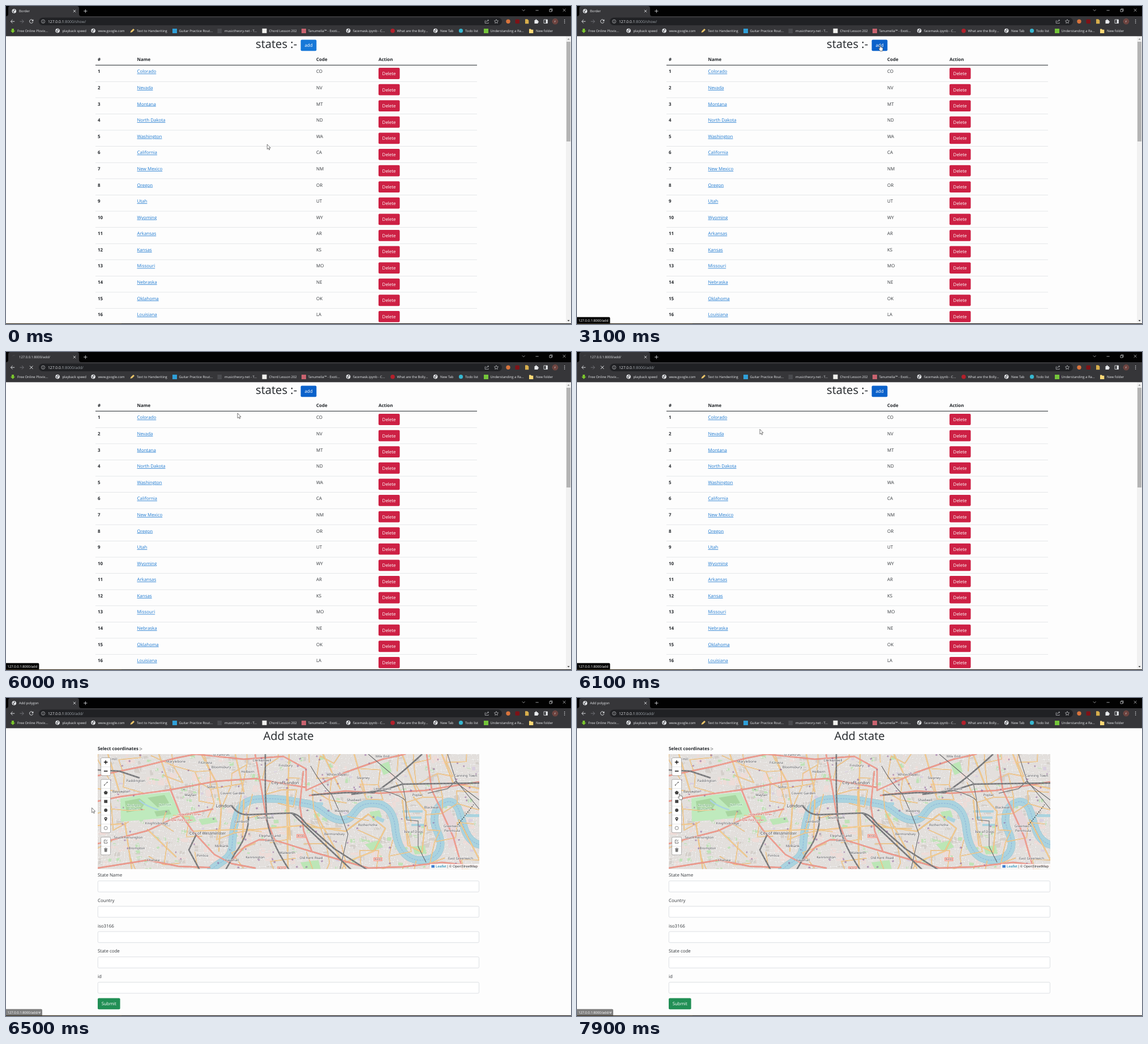
These frames come from a looping animation (998 by 561 pixels, 8 s). An HTML page:

```html
<!DOCTYPE html>
<html lang="en">
<head>
<meta charset="utf-8">
<title>States</title>
<style>
html, body { margin: 0; width: 100%; height: 100%; overflow: hidden; background: #fdfdfd; }
svg { display: block; width: 100vw; height: 100vh; text-rendering: geometricPrecision; }
text { font-family: "Open Sans", "Noto Sans", sans-serif; white-space: pre; }
.link { text-decoration: underline; text-decoration-thickness: .5px; }
.place text { font-family: "Noto Sans", sans-serif; text-anchor: middle; paint-order: stroke;
  stroke: #fff; stroke-opacity: .65; stroke-width: 1.3px; stroke-linejoin: round; }
.credit text { font-family: "Liberation Sans", Arial, sans-serif; }
</style>
</head>
<body>
<svg id="stage" viewBox="0 0 998 561" preserveAspectRatio="none"></svg>
<script>
const LOOP = 8000, STEP = 100;
const INK = '#212529', PALE = '#e8eaed';

const text = (x, y, s, size = 7.95, fill = INK, more = '') =>
  `<text x="${x}" y="${y}" font-size="${size}" fill="${fill}" ${more}>${s}</text>`;
const rect = (x, y, w, h, fill, r = 0, more = '') =>
  `<rect x="${x}" y="${y}" width="${w}" height="${h}" fill="${fill}" rx="${r}" ${more}/>`;
const disc = (x, y, r, fill, more = '') =>
  `<circle cx="${x}" cy="${y}" r="${r}" fill="${fill}" ${more}/>`;
const line = (d, stroke = PALE, w = .8, more = '') =>
  `<path d="${d}" fill="none" stroke="${stroke}" stroke-width="${w}" ${more}/>`;
const area = (d, fill, more = '') => `<path d="${d}" fill="${fill}" ${more}/>`;
const group = (id, body, more = '') => `<g id="${id}" ${more}>${body}</g>`;
const BOLD = 'font-weight="700"', MID = 'text-anchor="middle"';

let seed = 11;
const rnd = () => (seed = (seed * 16807) % 2147483647) / 2147483647;

/* ---------- browser frame ---------- */
const globe = (x, y) => disc(x, y, 3.8, PALE) +
  area(`M${x - 3} ${y - 1}l2.4 1.2 1 1.6-1.4 1.6zM${x - .3} ${y - 3}l2.6 1.2-1.2 1.6-1.8-.6z`, '#5a5b5f');

function bookmarks() {
  const mark = (x, y, s) => text(x, y, s, 5.92, PALE);
  const items = [[20, 'Free Online Plovix...'], [99.5, 'playback speed', 1], [162.5, 'www.google.com', 1],
    [231, 'Text to Handwriting'], [305.5, 'Guitar Practice Rout...'], [386, 'musictheory.net - T...'],
    [464.5, 'Chord Lesson 202'], [533.5, 'Tanumelia™ - Exoti...'], [613, 'facemask.ipynb - C...', 1],
    [690.5, 'What are the Bolly...'], [767, 'New Tab', 1], [811, 'Todo list'],
    [855.5, 'Understanding a Ra...'], [936, 'New folder']];
  return items.map(([x, s, web]) => mark(x, 46, s) + (web ? globe(x - 8.4, 43.6) : '')).join('') +
    area('M10 40h4v3.4h2.2l-4.2 4.4-4.2-4.4H10z', '#7ac52c') +
    area('M219.5 47l1-3 4.5-4 2 2-4 4z', '#e9c46a') +
    rect(294, 40, 8, 8, '#2f9fd8') + rect(373.5, 40, 7.5, 8, '#4a4b4f') +
    rect(452.5, 39.8, 8, 8, '#f1f1ee') + rect(522, 40, 8, 8, '#c9636f') +
    disc(683, 43.7, 3.8, '#b3202b') + disc(803.5, 43.7, 3.6, '#36b7d0') + rect(844, 40, 8, 8, '#74c53a') +
    area('M924 40.5h3l1 1.2h3.3v6.2H924z', '#fbd977');
}

function chrome() {
  return rect(0, 0, 998, 18, '#020202') +
    area('M0 18Q4 18 4 14V4Q4 0 8 0H125Q129 0 129 4V14Q129 18 133 18z', '#363639') +
    rect(0, 18, 998, 35.3, '#363639') + rect(58, 20.5, 818, 13.5, '#202124', 6.75) +
    group('favicon', globe(14.3, 9)) + group('spinner', line('M11.5 7.5A3.3 3.3 0 0 1 15.5 6', '#505054', .8)) +
    text(23, 11, '', 5.92, PALE, 'id="title"') +
    line('M118.8 6.8l4.4 4.4m0-4.4l-4.4 4.4M140.3 5.8v6.4M137.1 9h6.4') +
    line('M911.8 6.3l2.4 2.4 2.4-2.4M935.5 7.8h5.2M960 6.2h3.8v3.8H960zM961 6v-1h4v4h-1M983.7 5l4.8 4.8m0-4.8l-4.8 4.8', PALE, .65) +
    line('M15.2 27.2H8.6m3-3.2l-3.2 3.2 3.2 3.2', PALE, .9) +
    line('M24.5 27.2h6.6m-3-3.2l3.2 3.2-3.2 3.2', '#78797d', .9) +
    group('reload', line('M47.5 25.4A3.2 3.2 0 1 0 47.8 28', PALE, .9) + area('M48.3 23.6v3.2h-3.2z', PALE)) +
    group('stop', line('M42 24.5l5.4 5.4m0-5.4l-5.4 5.4', PALE, 1)) +
    disc(65.6, 27.2, 3.1, 'none', `stroke="${PALE}" stroke-width=".6"`) + line('M65.6 26.8v2M65.6 25.2v.7', PALE, .7) +
    `<text x="74" y="29.7" font-size="6.76" fill="#9aa0a6"><tspan fill="${PALE}">127.0.0.1</tspan><tspan id="url"></tspan></text>` +
    line('M847.5 26h-1.3v4.4h6V29M848.3 28.5q.3-3 4-3.2m-1.4-1.6l1.8 1.6-1.8 1.6', PALE, .6) +
    line('M866 23.6l1.1 2.3 2.5.3-1.9 1.7.5 2.5-2.2-1.2-2.2 1.2.5-2.5-1.9-1.7 2.5-.3z', PALE, .6) +
    disc(887, 27.2, 3.7, '#d9743c') + rect(899.5, 23.5, 7.5, 7.5, '#7d1217', 1.5) +
    area('M917 23.3h4l2.3 2.3v5.7H917z', '#d7ae4c') +
    area('M933.5 25h1.7q0-1.8 1.2-1.8t1.2 1.8h2v2q1.6 0 1.6 1.1t-1.6 1.1v1.9h-6.1z', PALE) +
    line('M950 24h6.4v6.4H950z', PALE, .8) + rect(953.6, 24, 2.8, 6.4, PALE) +
    disc(970, 27.2, 5.4, '#6d4440') + text(970, 29, 'r', 5.6, '#fff', MID) +
    [24.4, 27.2, 30].map(y => disc(986.6, y, .75, PALE)).join('') + bookmarks();
}

/* ---------- list page ---------- */
const STATES = ('Colorado CO,Nevada NV,Montana MT,North Dakota ND,Washington WA,California CA,New Mexico NM,Oregon OR,' +
  'Utah UT,Wyoming WY,Arkansas AR,Kansas KS,Missouri MO,Nebraska NE,Oklahoma OK,Louisiana LA').split(',');

function listPage() {
  let out = text(441, 74.4, 'states :-', 20.2, INK, 'font-weight="500"') +
    rect(520.6, 59.4, 27.8, 19.8, '', 2, 'id="addBtn"') + text(534.5, 72.1, 'add', 7.95, '#fff', MID) +
    [[162, '#'], [231.5, 'Name'], [548, 'Code'], [658, 'Action']].map(([x, s]) => text(x, 96.7, s, 7.9, INK, BOLD)).join('') +
    rect(158, 103.8, 674, 1.1, '#34383c');
  STATES.forEach((s, i) => {
    const y = i * 28.59;
    out += text(162, y + 118.4, i + 1, 7.9, INK, BOLD) +
      text(231.5, y + 118.4, s.slice(0, -3), 7.95, '#1b78d0', 'class="link"') +
      text(548, y + 118.4, s.slice(-2), 7.95, '#33373b') +
      rect(658, y + 109.1, 37.5, 19.8, '#cd2044', 2) + text(676.6, y + 122, 'Delete', 7.95, '#fff', MID) +
      rect(158, y + 133, 674, .6, '#d5d9dc');
  });
  return out + rect(989, 53.3, 9, 507, '#f1f1f1') + rect(990, 63, 7, 176, '#b4b4b4') +
    area('M991.6 59.4h4l-2-2.4z', '#888') + area('M991.6 554h4l-2 2.4z', '#444');
}

/* ---------- map ---------- */
function lattice(step, keep) {
  const cols = Math.ceil(720 / step), rows = Math.ceil(240 / step), at = [];
  for (let j = 0; j <= rows; j++) for (let i = 0; i <= cols; i++) {
    const x = 142 + (i + rnd() * .55) * step, y = 80 + (j + rnd() * .55) * step;
    at.push([x + 13 * Math.sin(y / 37 + x / 90), y + 12 * Math.sin(x / 47)].map(v => v.toFixed(1)));
  }
  let d = '';
  at.forEach((p, k) => {
    if ((k + 1) % (cols + 1) && rnd() < keep) d += `M${p}L${at[k + 1]}`;
    if (at[k + cols + 1] && rnd() < keep) d += `M${p}L${at[k + cols + 1]}`;
  });
  return d;
}

function patches(n, size) {
  let d = '';
  while (n--) {
    const w = 2 + rnd() * size, h = 2 + rnd() * size * .7, s = rnd() * 4 - 2;
    d += `M${(162 + rnd() * 674).toFixed(1)} ${(99 + rnd() * 203).toFixed(1)}l${w} ${s} ${-s} ${h} ${-w} ${-s}z`;
  }
  return d;
}

const PLACES = `Marylebone,300,112;Fitzrovia,352,113.5;St Pancras,380,100;Bloomsbury,380,122;Clerkenwell,452,110;
Finsbury,494,119;Holborn,427,130;Paddington,229,146;Bayswater,203,165;Soho,362,157;Mayfair,326,171;Covent Garden,400,168;
Whitechapel,584,135;Stepney,631,141;Mile End,665,103;Limehouse,665,160;Poplar,727,171;Canning Town,812,137;Shadwell,615,180;
Wapping,593,199;Blackwall,752,193;Rotherhithe,639,224;Southwark,458,211;Lambeth,416,218;Knightsbridge,266,221;
South Kensington,216,246;Brompton,231,265;Chelsea,260,286;Millbank,381,261;Pimlico,347,278;Vauxhall,399,286;
Kennington,440,281;Elephant and,466,243;Castle,466,251;Walworth,497,273;Old Kent Road,539,282;Bermondsey,580,240;
Isle of Dogs,720,236;Greenwich,788,226;Peninsula,788,234;East Greenwich,803,283;ing Hill,186,108`;

function tiles() {
  const round = 'stroke-linejoin="round" stroke-linecap="round"';
  const cased = (d, casing, fill, w) => line(d, casing, w + .7, round) + line(d, fill, w, round);
  const river = 'M360 306C372 290 397 287 399 264C401 240 402 226 407 210C413 186 428 178 452 178C485 176 510 183 535 187' +
    'C562 193 566 214 594 215C620 214 612 188 643 186C672 184 683 200 687 224C689 255 700 283 728 286' +
    'C766 288 774 262 763 238C752 216 754 190 780 183C803 180 803 218 812 236C818 250 828 258 842 260';
  const rail = 'M162 127L200 129 236 141M458 99V165L460 203M398 189Q408 205 425 206L500 203Q516 202 530 222L580 266 638 303' +
    'M460 206Q462 245 500 303M428 209Q430 240 404 275L388 303M540 171L600 167 650 167Q680 150 735 99' +
    'M336 241L323 268 342 303M610 170L665 163 700 152 836 150M505 203L560 256 610 303';
  const thin = 'M664 163Q700 172 706 182L708 215 728 217 728 262 742 290M745 168L780 160 795 146 836 196M780 99L796 150 836 180' +
    'M538 120Q555 150 575 170Q592 205 604 240L590 302M640 99L700 150 706 180';
  const trunk = 'M162 137L240 121 300 106 335 99M290 160L308 205M162 257L250 234 292 214 310 207 365 196M310 207L330 235 368 276 398 292' +
    'L440 300M398 288L422 262 447 250 475 251 540 271 640 300M536 172L600 164 660 168 740 163 836 148M525 130L519 190 526 235 540 270' +
    'M752 162L743 99M752 162L766 192 790 245 806 301M162 300L250 286 305 297 360 299M530 163L600 131 665 108 705 99' +
    'M335 99L420 108 490 103 530 125 530 163M475 251L460 215 452 165 440 99M640 300L700 298 770 290 836 297M162 182L202 174 290 162 370 147 440 142 530 158';
  const main = 'M180 99L200 165M270 99L292 162M345 99L372 150 380 195 376 270M405 99L420 165M500 99L498 170 502 250M560 99L590 160' +
    'M615 99L635 170M700 180L710 260 735 272 742 200 720 175M600 235L640 205 670 230 650 270 600 290M210 220L222 301M250 232L300 280' +
    'M162 225L203 222M330 235L405 232 440 232 520 225 600 235M420 180L418 250M496 165L498 300M545 200L600 300M770 99L790 150 836 160' +
    'M800 215L836 285M162 160L200 165M700 100L725 165';
  const halo = PLACES.split(';').map(p => {
    const [s, x, y] = p.trim().split(',');
    return text(x, +y + 2.1, s, 6.1, '#4c4c50');
  }).join('');
  const park = (x, y, s) => text(x, y, s, 4.9, '#4f9a5c', 'font-style="italic"');
  const shield = (x, y, s) => rect(x - 8, y - 4, 16, 7, '#f6a79a', 1) + text(x, y + 1.3, s, 4.8, '#7a3b33', 'stroke="none" text-anchor="middle"');

  return rect(162, 99, 674, 203, '#e3dfdc') + area(patches(150, 18), '#eedcd8') + area(patches(150, 13), '#d4cfca') +
    area(patches(120, 8), '#bfe3b7') + area(patches(60, 6), '#d9cfe0') +
    cased(lattice(7.5, .62), '#c9c5c1', '#fff', .75) +
    area('M202 177L240 171 289 166 307 204 288 211 203 218z', '#bfeabd') +
    area('M210 182l26-5 10 8-8 12-25 5zM250 176l30-5 8 14-20 8zM262 200l26-3 4 8-26 4z', '#a8d5a0') +
    line('M236 181Q246 190 268 197', '#aad3df', 2.6, round) +
    area('M308 207l22-2 6 12-16 5zM340 214l30-4 4 9-28 5zM634 258l24-7 8 12-20 8zM718 262l22-2 2 14-20 2zM642 201l18-3 4 12-16 8z' +
      'M520 290l32-4 4 16h-30zM660 118l16-6 5 18-14 6z', '#bce6b6') +
    area('M770 205l14-8 14 25-2 34-14 10-4-28z', '#e6d6d9') +
    cased(river, '#93b9c6', '#aad3df', 13) +
    area('M700 198h36v4h-36zM704 209h30v4h-30zM716 222h24v4h-24zM655 208l14 6-3 6-14-6zM812 205h24v5h-24zM548 184h12v5h-12z', '#aad3df') +
    line(river, '#7da3d6', .7, 'stroke-dasharray="3 1.8"') +
    cased(lattice(29, .42), '#d9a968', '#fbd9a4', .95) +
    cased(main, '#cf9f58', '#fcd49a', 1.5) + cased(trunk, '#d7776a', '#f3a396', 1.7) +
    line(thin, '#68696c', 1.1) + line(rail, '#6f7073', 2.5, 'stroke-linejoin="round"') +
    line(rail, '#b8b8ba', .5, 'stroke-dasharray="4 2"') + line('M798 224L826 188', '#222', 1.1, 'stroke-dasharray="2 2"') +
    area(patches(110, 1.2), '#8a5a9a', 'opacity=".55"') +
    group('places', halo + text(493, 151.7, 'City of London', 7.1, '#3d3d41') + text(356, 240.6, 'City of Westminster', 7, '#3d3d41') +
      text(385, 192.6, 'London', 7.9, '#333337') + park(281, 190, 'Hyde Park') + park(226, 191, 'Kensington') + park(226, 197, 'Gardens') +
      text(324, 207, 'Hyde Park Corner', 5, '#c0453e') + text(310, 217, 'Hyde Park Corner', 5, '#c0453e') +
      shield(657, 285, 'A200') + shield(521, 244, 'A100') + shield(487, 301, 'A215'), 'class="place"');
}

function mapTools() {
  const bar = (y, h, n) => rect(167.6, y, 17, h, '#fff', 2, 'stroke="#000" stroke-opacity=".28" stroke-width="1"') +
    Array.from({ length: n - 1 }, (_, i) => rect(168, y + (i + 1) * h / n, 16.2, .5, '#ccc')).join('');
  return bar(105.4, 31.4, 2) + bar(143.6, 94, 6) + bar(245.4, 31.4, 2) +
    line('M172.9 113.3h6.6M176.2 110v6.6M172.9 129h6.6', '#111', 1.4) +
    line('M173.6 153.8l5.2-5.2', '#444', .8) + disc(173.8, 153.7, .9, '#444') + disc(178.7, 148.7, .9, '#444') +
    area('M176.2 163.5l3.5 2.6-1.3 4h-4.4l-1.3-4z', '#444') + rect(173.3, 179.8, 5.8, 5.4, '#444') +
    disc(176.2, 198, 3, '#444') + area('M176.2 217.4q-2.6-3.4-2.6-4.9a2.6 2.6 0 0 1 5.2 0q0 1.5-2.6 4.9z', '#444') +
    disc(176.2, 212.5, .9, '#fff') + disc(176.2, 229.4, 3, '#fff', 'stroke="#555" stroke-width=".7"') +
    line('M177 250.6h-3.6v5.6h5.4V253.6M175.6 254l3.6-3.8', '#555', .8) +
    area('M173.6 266h5.2l-.4 5.6h-4.4z', '#777') + line('M173 265.3h6.4M175.2 264.5h2', '#777', .8);
}

/* ---------- form page ---------- */
function formPage() {
  const fields = ['State Name', 'Country', 'iso3166', 'State code', 'id'].map((s, i) => {
    const y = i * 44.68;
    return text(162, y + 315.2, s, 7.95, '#33373b') + rect(162.3, y + 322.7, 673.2, 19.5, '#fff', 2, 'stroke="#c6ccd2" stroke-width=".6"');
  }).join('');
  return text(499, 74.2, 'Add state', 20.2, INK, MID + ' font-weight="500"') +
    text(162, 91.7, 'Select coordinates :-', 7.85, INK, BOLD) +
    '<g clip-path="url(#mapBox)">' + rect(162, 99, 674, 203, '#ddd') + group('tiles', tiles()) + mapTools() +
    '<g class="credit">' + rect(749, 292.7, 87, 9, '#fff', 0, 'opacity=".85"') + rect(751.4, 294.8, 5.6, 4.6, '#3f7fd0') +
    text(759, 299.2, 'Leaflet', 6.24, '#0078a8') + text(779.3, 299.2, '| © OpenStreetMap', 6.24, '#333') + '</g></g>' +
    fields + rect(162, 529.4, 39.6, 19.8, '#218f55', 2) + text(181.8, 542.2, 'Submit', 7.95, '#fff', MID);
}

const EDGE = 'stroke="#222" stroke-width=".6" stroke-linejoin="round"';
const POINTERS = {
  arrow: area('M0 0V8.6L2 6.9 3.4 9.8 4.7 9.2 3.4 6.3H6z', '#fff', EDGE),
  hand: area('M-.7.7C-.7-.3.8-.3.8.7V3.6Q1.7 3 2.3 3.9 3.2 3.4 3.7 4.3 4.9 4 4.9 5.3V7.5Q4.9 9 4 10.5H.2Q-1 8.8-2.3 6.6-2.9 5.2-1.7 5.2L-.7 6.2z', '#fff', EDGE),
  grab: area('M-2 4.5Q-3.5 2-4.3.3-4.2-.8-3 0L-2.2 1-3-2.6Q-2.6-3.8-1.8-2.8L-1.3-.8V-3.8Q-.5-4.8.2-3.8V-.8L.9-3.4Q1.8-4.2 2.2-3.2L1.9-.4 2.9-1.8Q4-2 3.8-1 3 1.5 2.6 3V4.5z', '#fff', EDGE)
};

const stage = document.getElementById('stage');
stage.innerHTML = '<defs><clipPath id="mapBox"><rect x="162" y="99" width="674" height="202.6"/></clipPath></defs>' +
  rect(0, 0, 998, 561, '#fdfdfd') + group('list', listPage()) + group('form', formPage()) + chrome() +
  group('status', area('', '#060606', 'id="statusBox"') + text(2.6, 556.7, '', 5.92, '#fff', 'id="statusText"')) +
  rect(0, 559.9, 998, 1.1, '#15130f') + rect(0, 559.9, 204, 1.1, '#3a3020') +
  group('cursor', Object.entries(POINTERS).map(([id, shape]) => group(id, shape)).join(''));

/* ---------- motion ---------- */
const $ = id => document.getElementById(id);
const show = (id, on) => $(id).setAttribute('display', on ? 'inline' : 'none');
const ramp = (t, a, b) => Math.min(1, Math.max(0, (t - a) / (b - a)));

const PATH = [[0, 461.3, 244], [100, 461.3, 244], [1200, 535.3, 69], [5700, 535.3, 69], [6000, 409, 108],
  [6300, 151, 193], [6600, 152, 194], [7000, 241, 184.5], [7500, 240, 184], [7900, 181.3, 169], [LOOP, 181.3, 169]];

function cursorAt(t) {
  const i = PATH.findIndex(k => k[0] > t), [a, ax, ay] = PATH[i - 1], [b, bx, by] = PATH[i];
  let p = ramp(t, a, b);
  if (b - a > 300) p = p * p * (3 - 2 * p);
  return [ax + (bx - ax) * p, ay + (by - ay) * p];
}

function pointerFor(x, y, form) {
  const inside = (l, t, r, b) => x > l && x < r && y > t && y < b;
  if (!form) return inside(520, 59, 549, 79) ? 'hand' : 'arrow';
  if (!inside(162, 99, 836, 302)) return 'arrow';
  return inside(167, 105, 185, 277) ? 'hand' : 'grab';
}

function render(ms) {
  const t = Math.floor(ms % LOOP / STEP) * STEP;
  const form = t >= 6150, loading = t >= 5900 && !form;
  show('list', !form);
  show('form', form);
  show('favicon', !loading);
  show('spinner', loading);
  show('reload', !loading);
  show('stop', loading);
  $('title').textContent = form ? 'Add polygon' : loading ? '127.0.0.1:8000/add/' : 'Border';
  $('url').textContent = form || loading ? ':8000/add/' : ':8000/show/';
  $('tiles').setAttribute('opacity', ramp(t, 6180, 6380));

  const h = ramp(t, 1150, 1400), mix = (a, b) => Math.round(a + (b - a) * h);
  $('addBtn').setAttribute('fill', `rgb(${mix(23, 11)},${mix(120, 98)},${mix(216, 203)})`);

  const fade = t < 7000 ? ramp(t, 1300, 1500) * (1 - ramp(t, 6400, 6600)) : ramp(t, 7800, 8000);
  $('status').setAttribute('opacity', fade);
  $('statusText').textContent = '127.0.0.1:8000/add' + (form ? '/#' : '');
  $('statusBox').setAttribute('d', `M0 548.8H${form ? 62 : 56.4}q2 0 2 2V560.5H0z`);

  const [x, y] = cursorAt(t), kind = pointerFor(x, y, form);
  $('cursor').setAttribute('transform', `translate(${x} ${y})`);
  for (const id in POINTERS) show(id, id === kind);
}

const start = performance.now();
function tick() {
  render(performance.now() - start);
  requestAnimationFrame(tick);
}
tick();
</script>
</body>
</html>
```
